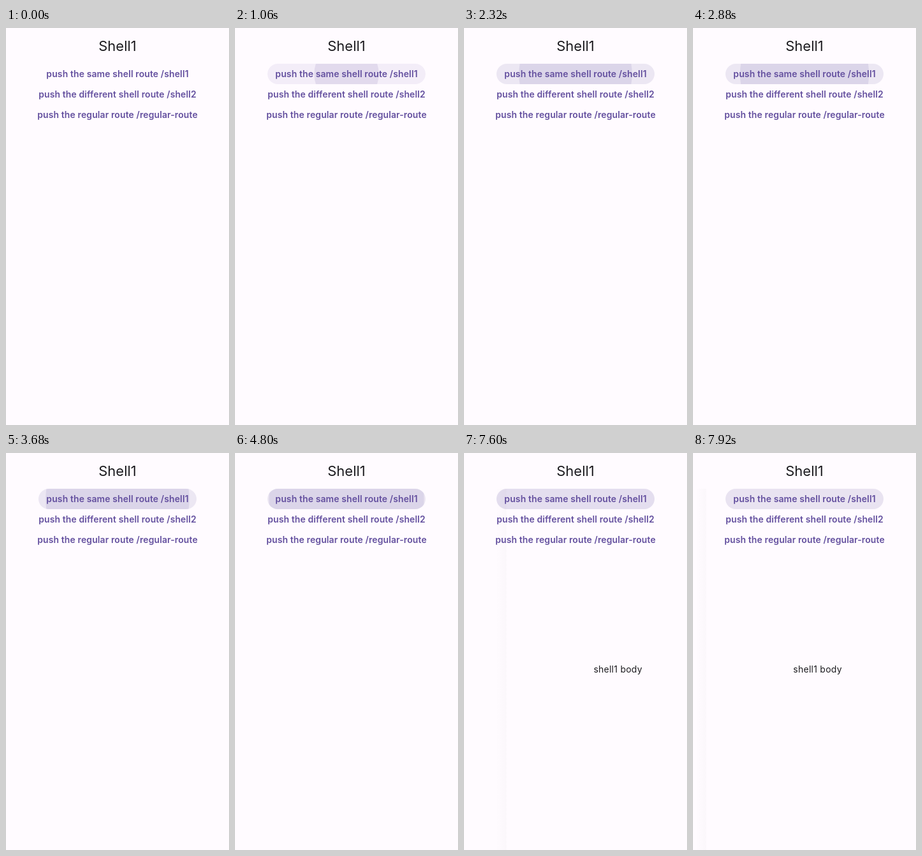
Recreate the animation shown at these times as an HTML page. Size 350x622 px, loop 8 s.

```html
<!DOCTYPE html>
<html lang="en">
<head>
<meta charset="utf-8">
<title>Shell routes</title>
<style>
  html, body { margin: 0; width: 100%; height: 100%; overflow: hidden; }
  body { position: relative; background: #fffbff; color: #1c1b1f; font-family: Inter, sans-serif; font-optical-sizing: none; white-space: nowrap; }
  h1, .button, .body { position: absolute; margin: 0; text-align: center; }
  h1 { left: 0; width: 350px; top: 14px; font-size: 22px; font-weight: 400; line-height: 28px; }
  .button { left: 0; width: 350px; height: 32px; font-size: 14px; font-weight: 600; line-height: 32px; letter-spacing: .1px; color: #64509f; }
  .ink { position: absolute; left: 51px; top: 56px; width: 248px; height: 32px; border-radius: 16px; overflow: hidden; }
  .ink svg { display: block; }
  .page { position: absolute; left: 0; top: 56px; width: 350px; height: 566px; }
  .shadow { position: absolute; left: -17.5px; width: 17.5px; height: 100%; background: linear-gradient(to left, rgba(0, 0, 0, .016), transparent); }
  .body { left: 0; width: 100%; top: 273px; font-size: 14px; line-height: 20px; letter-spacing: .25px; }
</style>
</head>
<body>
<div class="page" id="page"><div class="shadow"></div><div class="body">shell1 body</div></div>
<div class="ink">
  <svg width="248" height="32" fill="#64509f">
    <rect id="highlight" width="248" height="32"/>
    <circle id="ripple" cx="124" cy="16" r="0"/>
  </svg>
</div>
<h1>Shell1</h1>
<div class="button" style="top:56px">push the same shell route /shell1</div>
<div class="button" style="top:88px">push the different shell route /shell2</div>
<div class="button" style="top:120px">push the regular route /regular-route</div>
<script>
  const LOOP = 8000, PRESS_TIME = 500, CYCLE = 560;
  const OFFSETS = [0, 140, 260, 380, 520];
  const TICK = 0.0188;                 // app seconds per displayed tick
  const PRESS = -2.05, RELEASE = 57.22; // in ticks
  const INK_ALPHA = 0.12;

  const $ = id => document.getElementById(id);
  const clamp = v => Math.min(1, Math.max(0, v));

  function bezier(x1, y1, x2, y2) {
    const at = (a, b, s) => 3 * a * s * (1 - s) ** 2 + 3 * b * s * s * (1 - s) + s ** 3;
    return x => {
      let lo = 0, hi = 1;
      for (let i = 0; i < 24; i++) {
        const mid = (lo + hi) / 2;
        if (at(x1, x2, mid) < x) lo = mid; else hi = mid;
      }
      return at(y1, y2, (lo + hi) / 2);
    };
  }
  const ease = bezier(.25, .1, .25, 1);
  const linearToEaseOut = bezier(.35, .91, .33, .97);

  // The picture advances in uneven steps, five per cycle.
  function tickAt(ms) {
    const t = ms - PRESS_TIME;
    if (t < 0) return -1;
    const phase = t % CYCLE;
    return 5 * Math.floor(t / CYCLE) + OFFSETS.filter(o => o <= phase).length - 1;
  }

  function draw(ms) {
    const tick = tickAt(ms), visible = tick >= 0;
    const progress = (start, seconds) => clamp((tick - start) * TICK / seconds);

    const highlight = progress(PRESS, .2) - progress(RELEASE, .2);
    $('highlight').setAttribute('opacity', visible ? INK_ALPHA * highlight : 0);
    $('ripple').setAttribute('opacity', visible ? INK_ALPHA * progress(PRESS, .075) : 0);
    $('ripple').setAttribute('r', 37.5 + 87.5 * ease(progress(PRESS, 1)));

    const slide = linearToEaseOut(progress(RELEASE, .3));
    $('page').style.visibility = tick > RELEASE ? 'visible' : 'hidden';
    $('page').style.transform = `translateX(${350 * (1 - slide)}px)`;
  }

  const start = performance.now();
  function frame() {
    draw((performance.now() - start) % LOOP);
    requestAnimationFrame(frame);
  }
  frame();
</script>
</body>
</html>
```
